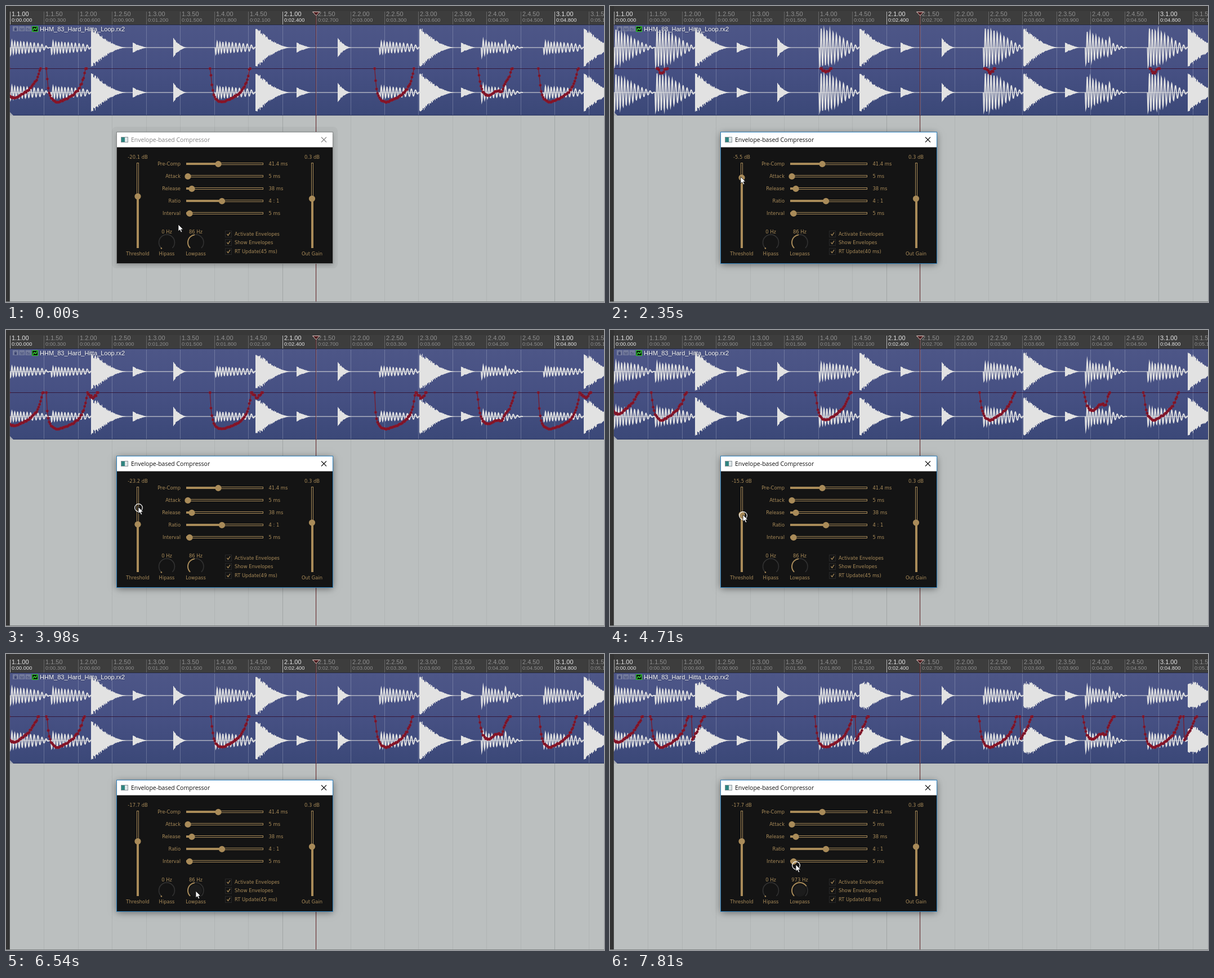
Animation of 1062x527 px, one loop 8000 ms. Source, as an HTML page with a canvas:

```html
<!DOCTYPE html>
<html lang="en">
<head>
<meta charset="utf-8">
<title>Envelope-based Compressor</title>
<style>
  html, body { margin: 0; width: 100%; height: 100%; overflow: hidden; background: #bbbfbf; }
  canvas { display: block; }
</style>
</head>
<body>
<canvas id="stage" width="1062" height="527"></canvas>
<script>
const ctx = document.getElementById('stage').getContext('2d');
const LOOP = 8000, SLOT = LOOP / 44;
const GOLD = '#a98b59', WAVE = '#e2e2e2', UNITY = 111, BAR = 291.5, BEAT = 60.45;
const UI = 'px "DejaVu Sans", sans-serif', ARIAL = 'px "Liberation Sans", sans-serif';

const ramp = (slot, from, to) => Math.min(1, Math.max(0, (slot - from) / (to - from)));
function random(n) {
  const v = Math.sin(n * 12.9898) * 43758.5453;
  return v - Math.floor(v);
}

// All moving values at a time slot: four threshold drags, then one lowpass drag.
function stateAt(slot) {
  const up = ramp(slot, 9, 13), down = ramp(slot, 15, 21), back = ramp(slot, 22, 26);
  const settle = ramp(slot, 27, 29), open = ramp(slot, 38, 42);
  return {
    slot, open,
    threshold: -20.1 + 14.6 * up - 17.7 * down + 7.7 * back - 2.2 * settle,
    hz: 86 * (973 / 86) ** open,
    updateMs: Math.round(45 - 5 * up + 9 * down - 4 * back + 3 * open),
  };
}

// Pointer stops as [slot, x, y]
const STOPS = [[0, 306, 389], [3, 460, 443], [7, 236, 336], [9, 235, 332], [13, 232, 304], [15, 232, 304],
  [20, 234, 345], [22, 235, 315], [26, 236, 329], [29, 236, 334], [31, 293, 428], [36, 337, 422],
  [41, 337, 400], [43, 330, 375]];
const CLICKS = [9, 22, 26, 39, 43];

// Each hit has an amplitude that decays over len, and some have a level in dB seen by the compressor.
const bump = d => Math.exp(-(((d - 43) / 4) ** 2));
const decay = ({ peak, len, power }, d) => Math.min(34, peak * Math.max(0, 1 - d / len) ** power);
const kick = (x, peak, power, loud, hold, echo = 0) => ({
  x, peak, power, tone: true, len: 74, echo,
  level(d) {
    const u = Math.max(0, d - hold);
    return d < 0 ? -60 : loud - 16 * Math.exp(-d / 6) - .22 * u - 4e-10 * u ** 6 + echo * .3 * bump(d);
  }
});
const snare = x => ({
  x, peak: 40, power: 1.8, len: 64,
  level(d, open) {
    const closed = -21.9 - .02 * (d - 3) ** 2;
    const wide = d < -6 ? -40 : -9 - .42 * (d + 6);
    return d < -9 ? -60 : closed + (wide - closed) * open;
  }
});

const hits = [{ ...kick(-8, 34, 1.2, -7.5, 25), lead: 15 }, { ...kick(837, 30, 1.3, -8.6, 19.5, 8), lead: 7 }];
for (let x = 0; x < 1000; x += BAR) {
  hits.push({ ...kick(72 + x, 42, 1.1, -3.7, 20), lead: 8 }, snare(151 + x));
  hits.push({ x: 224.5 + x, peak: 9, power: 1.2, len: 25 });
  if (x < 2 * BAR) hits.push({ x: 297 + x, peak: 17, power: 1.8, len: 25 });
}

function levelAt(x, open) {
  let loudest = -60;
  for (const hit of hits) {
    const d = x - hit.x;
    if (hit.level && d > -9 && d < 85) loudest = Math.max(loudest, hit.level(d, open));
  }
  return loudest + (random(Math.round(x)) - .5) * .8;
}
const gainOf = (db, threshold) => 10 ** (-.7 * Math.max(0, db - threshold) / 20);

// Drawing helpers
function rect(x, y, w, h, color) { ctx.fillStyle = color; ctx.fillRect(x, y, w, h); }
function frame(x, y, w, h, color) {
  ctx.strokeStyle = color; ctx.lineWidth = 1;
  ctx.strokeRect(x + .5, y + .5, w - 1, h - 1);
}
function line(points, color, width = 1) {
  ctx.beginPath();
  for (const [x, y] of points) ctx.lineTo(x, y);
  ctx.strokeStyle = color; ctx.lineWidth = width; ctx.stroke();
}
function disc(x, y, r, color) {
  ctx.beginPath(); ctx.arc(x, y, r, 0, 7);
  ctx.fillStyle = color; ctx.fill();
}
function arc(x, y, r, from, to, color, width) {
  ctx.beginPath(); ctx.arc(x, y, r, from, to);
  ctx.strokeStyle = color; ctx.lineWidth = width; ctx.stroke();
}
function text(value, x, y, font, color, align = 'left') {
  ctx.font = font; ctx.fillStyle = color; ctx.textAlign = align;
  ctx.fillText(value, x, y);
}
const label = (value, x, y, align) => text(value, x, y, 8.4 + UI, GOLD, align);

function drawRuler() {
  rect(0, 0, 1062, 34, '#3d3d3d');
  rect(0, 0, 1062, 9, '#383838');
  for (let i = 0; i < 18; i++) {
    const x = Math.round(7 + i * BEAT), major = i % 8 === 0;
    const color = major ? '#e4e4e4' : '#8e8e8e';
    const beat = `${(i >> 3) + 1}.${(i % 8 >> 1) + 1}.${i % 2 ? '50' : '00'}`;
    rect(x, 10, 1, 24, major ? '#b8b8b8' : '#666');
    text(beat, x + 3, 18, 11 + ARIAL, color);
    text(`0:0${(i * .3).toFixed(3)}`, x + 3, 28, 9.4 + ARIAL, color);
  }
}

function drawClip() {
  const fill = ctx.createLinearGradient(0, 35, 0, 195);
  fill.addColorStop(0, '#4d5687');
  fill.addColorStop(.5, '#465083');
  fill.addColorStop(1, '#3b4878');
  rect(7, 34, 1055, 161, fill);
  rect(7, 33, 1055, 1, '#252a40');
  rect(7, 194, 1055, 1, '#2d3760');
  for (let i = 1; i < 18; i++) {
    const x = Math.round(7 + i * BEAT);
    rect(x, 35, 1, 159, 'rgba(190,195,215,.32)');
    rect(x, 195, 1, 331, i % 8 ? 'rgba(80,90,90,.1)' : 'rgba(80,90,90,.25)');
  }
  ctx.beginPath();
  ctx.moveTo(7, 189); ctx.lineTo(13, 195); ctx.lineTo(7, 195);
  ctx.fillStyle = '#a9adb4'; ctx.fill();
}

function drawHit(hit, center, gainAt) {
  const start = hit.x + (hit.lead || 0);
  if (hit.tone) {
    const points = [];
    for (let d = 0; d <= hit.len; d += .5) {
      const size = decay(hit, d) + hit.echo * bump(d);
      const swing = Math.sin(2 * Math.PI * d / (4.7 + d * .02));
      points.push([start + d, center + size * gainAt(start + d) * swing]);
    }
    line(points, WAVE, 1.8);
    return;
  }
  for (let d = 0; d < hit.len; d++) {
    const size = decay(hit, d) * gainAt(start + d);
    const rough = d < 4 ? .05 : .22;
    const up = size * (1 - rough * random(start + d)), down = size * (1 - rough * random(start - d));
    rect(Math.round(start + d), center - up, 1, up + down, WAVE);
  }
}

function drawEnvelope({ threshold, open }) {
  const runs = [];
  let run = null;
  rect(7, UNITY, 1055, 1, '#33183a');
  for (let x = 7; x < 1045; x += 1.7) {
    const db = levelAt(x, open), reduced = db > threshold - .3;
    if (reduced) {
      if (!run) runs.push(run = [[x - 1.7, UNITY + .5]]);
      run.push([x, UNITY + .5 + 83 * (1 - gainOf(db, threshold))]);
    } else if (run) {
      run.push([x, UNITY + .5]);
      run = null;
    }
  }
  for (const points of runs) {
    line(points, '#7d1626', 1.2);
    for (const [x, y] of points) {
      disc(x, y, 2.4, '#8f1425');
      disc(x, y, 1.1, '#5b1a33');
    }
  }
}

function drawClipHeader() {
  ['', 'M', 'fx'].forEach((mark, i) => {
    const x = 12 + i * 11.3;
    rect(x, 36, 10, 9, 'rgba(150,155,175,.55)');
    text(mark, x + 5, 43.5, 7.5 + ARIAL, '#3d4672', 'center');
  });
  rect(15, 40, 4, 4, '#3d4672');
  arc(17, 40, 1.5, Math.PI, 0, '#3d4672', 1);
  rect(46, 36, 11, 10, '#0b1a0b');
  frame(46, 36, 11, 10, '#32d832');
  line([[48, 44], [50, 40], [53, 42], [55, 38]], '#3cf03c', 1.3);
  ctx.shadowColor = '#1d2340'; ctx.shadowBlur = 2;
  text('HHM_83_Hard_Hitta_Loop.rx2', 60, 44.5, 11 + ARIAL, '#fff');
  ctx.shadowBlur = 0;
}

function drawPlayhead() {
  rect(550, 16, 1, 510, '#6a2a2d');
  ctx.beginPath();
  ctx.moveTo(544.5, 10.5); ctx.lineTo(557, 10.5); ctx.lineTo(550.7, 17); ctx.closePath();
  ctx.fillStyle = '#4b1c1e'; ctx.fill();
  ctx.strokeStyle = '#e3c6c2'; ctx.lineWidth = 1; ctx.stroke();
}

function drawHorizontalSlider(name, value, y, thumb) {
  label(name, 310, y + 3.3, 'right');
  label(value, 466.5, y + 3.3);
  frame(320, y - 2, 137, 4, GOLD);
  rect(320, y - 2, thumb - 320, 4, GOLD);
  disc(thumb, y + .4, 5.6, GOLD);
}
function drawVerticalSlider(name, value, x, thumb) {
  label(value, x, 272, 'center');
  label(name, x, 444, 'center');
  frame(Math.round(x) - 2, 279, 4, 152, GOLD);
  rect(Math.round(x) - 2, thumb, 4, 431 - thumb, GOLD);
  disc(x, thumb, 5.6, GOLD);
}
function drawKnob(name, hz, x, turn, hover) {
  const from = Math.PI * .75;
  if (hover) disc(x, 421, 11, '#1c1c1c');
  arc(x, 421, 14, from, Math.PI * 2.25, '#333', 1.5);
  arc(x, 421, 14, from, from + turn * Math.PI * 1.5, GOLD, 2);
  label(`${Math.round(hz)} Hz`, x, 405, 'center');
  label(name, x, 444, 'center');
}
function drawCheckbox(name, y) {
  frame(389, y - 6, 12, 12, '#282828');
  line([[392.5, y], [394.5, y + 2.5], [398, y - 3]], GOLD, 1.3);
  label(name, 406, y + 3.2);
}

function drawDialog({ slot, threshold, hz, open, updateMs }) {
  const active = slot >= 9, ink = active ? '#111' : '#858585';
  ctx.shadowColor = `rgba(0,0,0,${active ? .5 : .28})`;
  ctx.shadowBlur = active ? 12 : 7;
  ctx.shadowOffsetY = 2;
  rect(197, 225, 383, 233, '#141414');
  ctx.shadowBlur = ctx.shadowOffsetY = 0;
  ctx.shadowColor = 'transparent';
  if (!active) {
    ctx.beginPath();
    ctx.roundRect(188, 215, 401, 252, 8);
    ctx.rect(196, 224, 385, 235);
    ctx.fillStyle = 'rgba(0,0,0,.04)';
    ctx.fill('evenodd');
  }
  rect(197, 225, 383, 26.5, '#fff');
  frame(196, 224, 385, 235, active ? '#2c80bd' : '#858989');
  rect(204, 233, 13, 10, '#dfe6e8');
  rect(205, 234, 6, 8, '#2f8580');
  frame(204, 233, 13, 10, '#8b969b');
  text('Envelope-based Compressor', 222, 242, '10.5px "Open Sans", sans-serif', ink);
  line([[560, 233.5], [569, 242.5]], ink, 1.1);
  line([[569, 233.5], [560, 242.5]], ink, 1.1);

  drawVerticalSlider('Threshold', `${threshold.toFixed(1)} dB`, 234, 293 - 2.29 * threshold);
  drawVerticalSlider('Out Gain', '0.3 dB', 543.5, 343);
  drawHorizontalSlider('Pre-Comp', '41.4 ms', 281, 377);
  drawHorizontalSlider('Attack', '5 ms', 303, 323);
  drawHorizontalSlider('Release', '38 ms', 325, 330);
  drawHorizontalSlider('Ratio', '4 : 1', 347, 383.5);
  drawHorizontalSlider('Interval', '5 ms', 369, 326);
  drawKnob('Hipass', 0, 285.5, .01, false);
  disc(276, 431.5, 1.2, GOLD);
  drawKnob('Lowpass', hz, 337, .47 + .24 * open, slot >= 35);
  drawCheckbox('Activate Envelopes', 406);
  drawCheckbox('Show Envelopes', 421);
  drawCheckbox(`RT Update(${updateMs} ms)`, 437);
}

function drawPointer(slot) {
  const next = Math.max(1, STOPS.findIndex(stop => stop[0] >= slot));
  const [from, x0, y0] = STOPS[next - 1], [to, x1, y1] = STOPS[next];
  const u = ramp(slot, from, to), x = x0 + (x1 - x0) * u, y = y0 + (y1 - y0) * u;
  if (CLICKS.includes(slot)) arc(x + .5, y + 1.5, 6.8, 0, 7, '#fff', 1.2);
  ctx.beginPath();
  [[0, 0], [0, 12], [2.8, 9.6], [4.8, 14], [6.8, 13], [4.9, 8.9], [8.6, 8.7]]
    .forEach(([dx, dy]) => ctx.lineTo(x + dx, y + dy));
  ctx.closePath();
  ctx.fillStyle = '#fff'; ctx.strokeStyle = '#111'; ctx.lineWidth = .8;
  ctx.fill(); ctx.stroke();
}

function draw(slot) {
  const state = stateAt(slot);
  const gainAt = x => gainOf(levelAt(x, state.open), state.threshold);
  rect(0, 0, 1062, 527, '#bbbfbf');
  drawRuler();
  drawClip();
  for (const center of [74, 154]) {
    rect(7, center - .5, 1055, 1, WAVE);
    for (const hit of hits) drawHit(hit, center, gainAt);
  }
  drawEnvelope(state);
  drawClipHeader();
  rect(0, 0, 7, 527, '#333');
  rect(6, 34, 1, 493, '#4a4a4a');
  rect(0, 526, 1062, 1, '#7f8383');
  drawPlayhead();
  drawDialog(state);
  drawPointer(slot);
}

let shown = -1;
function tick() {
  const slot = Math.floor((performance.now() % LOOP + 25) / SLOT) % 44;
  if (slot !== shown) draw(shown = slot);
  requestAnimationFrame(tick);
}
tick();
</script>
</body>
</html>
```
